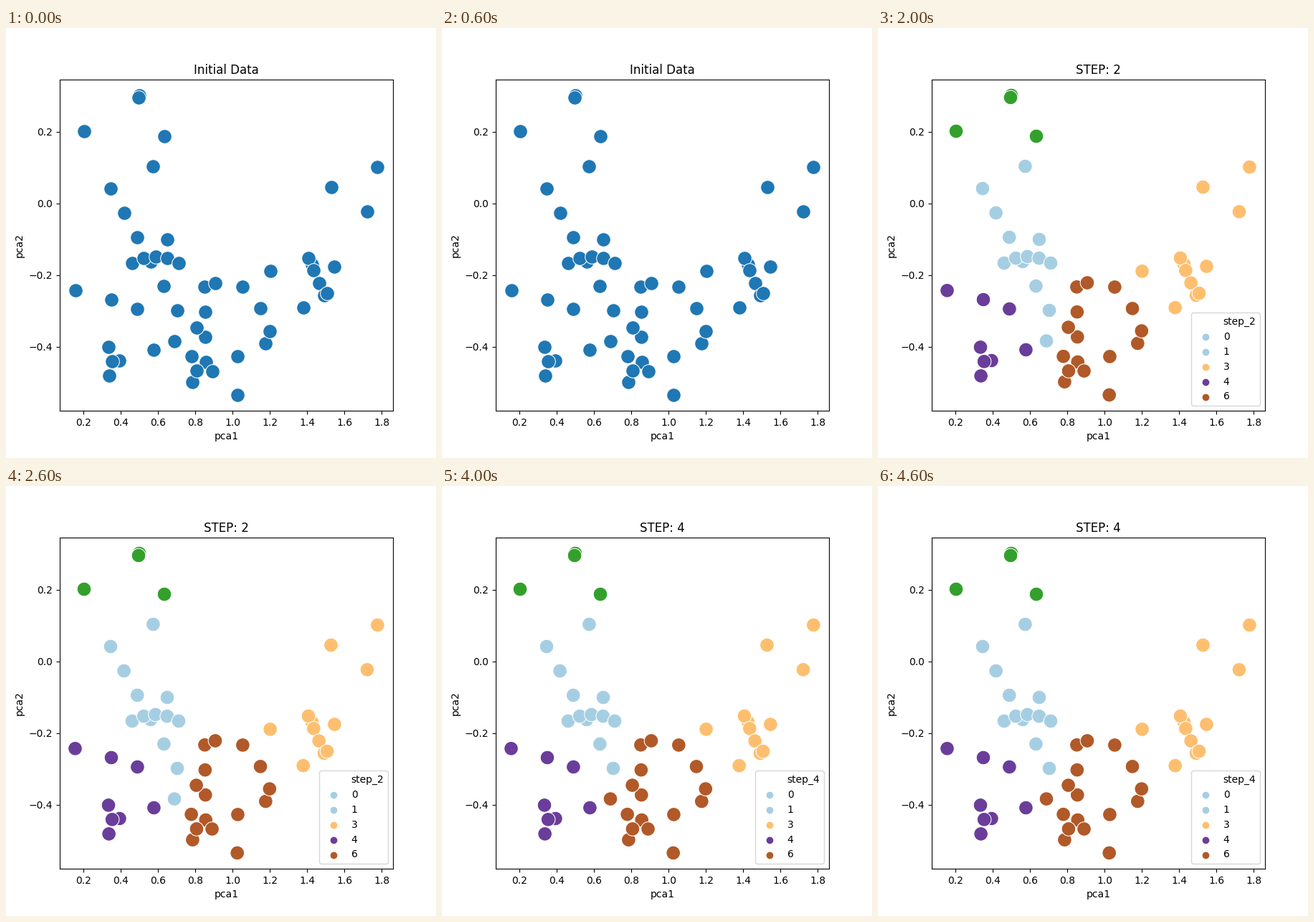
These frames come from a looping animation (600x600 px, 5000 ms). A matplotlib script:

```python
import matplotlib.pyplot as plt
import numpy as np
from matplotlib.animation import FuncAnimation

plt.rcParams["text.kerning_factor"] = 6

HUES = {"S": "#a6cee3", "G": "#33a02c", "O": "#fdbf6f", "P": "#6a3d9a", "B": "#b15928"}
LEGEND = zip("01346", "SSOPB")
X_SCALE, Y_SCALE = 260.3, 500  # pixels per data unit


def arc(start, end=None, n=2, bow=0.0):
    """n evenly spaced points from start to end, bowed sideways by a share of the length."""
    a = complex(*start)
    if end is None:
        return np.array([a])
    t = np.linspace(0, 1, n)
    return a + (complex(*end) - a) * (t + 4j * bow * t * (1 - t))


# Arcs of points in stage pixels, keyed by their cluster at steps 1 to 4
STRANDS = [
    ("GGGG", arc((186, 94), (185, 97))),
    ("GGGG", arc((109, 144), (221, 151))),
    ("SSSS", arc((205.4, 193))),
    ("SSSS", arc((146, 224), (239, 394), 6)),
    ("SSSS", arc((176, 328), (241, 328), 5, -0.14)),
    ("SSBB", arc((235, 436.6))),
    ("SPPP", arc((96.5, 366.3))),
    ("PSSS", arc((225, 295))),
    ("PPPP", arc((147, 379), (183.4, 392))),
    ("PPPP", arc((206.4, 449), (158.4, 464))),
    ("PPPP", arc((143, 445.4), (143.6, 485.4), 3, -0.12)),
    ("BOOO", arc((453.5, 222), (427, 329.6))),
    ("BOOO", arc((368.6, 339.4))),
    ("OOOO", arc((518.4, 194), (504, 256.3))),
    ("OOOO", arc((422, 321), (444, 373), 4)),
    ("OOOO", arc((458.4, 332.6), (414.7, 390.2), 3, -0.2)),
    ("OBBB", arc((362.3, 440), (367.8, 422.6))),
    ("OBBB", arc((260.4, 493.7), (322.7, 512))),
    ("BBBB", arc((277.4, 361.3), (278.7, 466), 4)),
    ("BBBB", arc((292, 355.5), (355, 391.4), 3, -0.19)),
    ("BBBB", arc((265.6, 417.6), (323.4, 458.4), 5, 0.7)),
]

stage = np.concatenate([pts for _, pts in STRANDS])
pca1 = 1 + (stage.real - 316) / X_SCALE
pca2 = (245 - stage.imag) / Y_SCALE
legend_items = [(name, HUES[key]) for name, key in LEGEND]

fig, ax = plt.subplots(figsize=(6, 6), dpi=100)


def add_legend(step):
    entries = [(f"step_{step}", "w"), *legend_items]
    handles = [ax.scatter([], [], color=c, label=name) for name, c in entries]
    ax.legend(handles=handles, loc="lower right")


def draw(step):
    ax.clear()
    if step == 0:
        colors, title = "C0", "Initial Data"
    else:
        colors = [HUES[keys[step - 1]] for keys, pts in STRANDS for _ in pts]
        title = f"STEP: {step}"
        add_legend(step)
    ax.scatter(pca1, pca2, s=200, c=colors, edgecolors="w", linewidths=0.75)
    ax.set(title=title, xlabel="pca1", ylabel="pca2",
           xlim=(1 - 241 / X_SCALE, 1 + 224 / X_SCALE),
           ylim=(-289 / Y_SCALE, 173 / Y_SCALE))


anim = FuncAnimation(fig, draw, frames=5, init_func=lambda: None,
                     interval=1000, repeat=True, repeat_delay=0)
plt.show()
```
